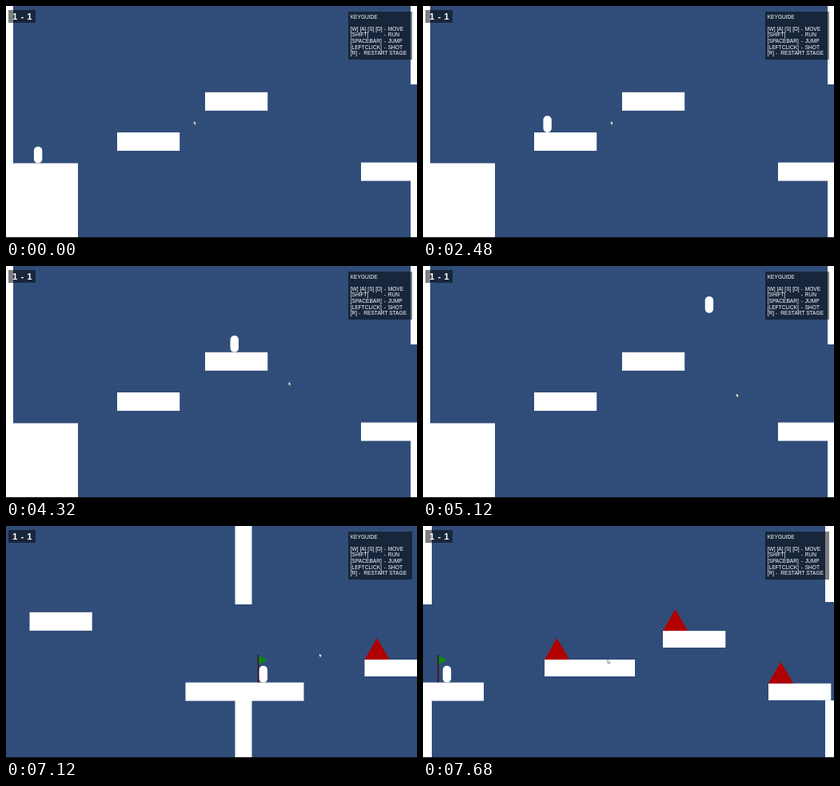
Recreate the animation shown at these times as an HTML page. Size 514x290 px, loop 7.76 s.

```html
<!DOCTYPE html>
<html lang="en">
<head>
<meta charset="utf-8">
<title>Platform stage</title>
<style>
  html, body { margin: 0; width: 100%; height: 100%; overflow: hidden; background: #304d79; }
  svg { display: block; width: 514px; height: 290px; }
  text { font-family: "Liberation Sans", Arial, sans-serif; fill: #fff; white-space: pre; }
</style>
</head>
<body>
<svg viewBox="0 0 514 290">
  <rect width="514" height="290" fill="#304d79"/>
  <g id="world">
    <g id="blocks" fill="#fff"></g>
    <g id="spikes" fill="#b00000"></g>
    <path d="M535 161V195.5" stroke="#4c0b12" stroke-width="1.5"/>
    <path d="M536 162L545.5 167.5L536 173Z" fill="#0a8c14"/>
    <rect id="player" width="10.4" height="20.8" rx="5" fill="#fff"/>
  </g>
  <rect y="289" width="514" height="1" fill="#080808"/>
  <g fill="#000" fill-opacity=".5">
    <rect x="3" y="5" width="34" height="16"/>
    <rect x="428" y="7" width="80" height="60"/>
  </g>
  <text x="7.9" y="16.6" font-size="11.4" font-weight="bold" word-spacing="1">1 - 1</text>
  <g id="guide" font-size="6.6"></g>
  <path id="cursor" d="M0 0L0 5L1.2 4L2 6L2.8 5.6L2 3.7L3.4 3.6Z" fill="#fff" stroke="#222" stroke-width=".4"/>
</svg>
<script>
const LOOP = 7760, STEP = 80, WIDTH = 514, HEIGHT = 290;
const byId = id => document.getElementById(id);

function add(parent, tag, attrs, text = "") {
  const node = document.createElementNS("http://www.w3.org/2000/svg", tag);
  for (const key in attrs) node.setAttribute(key, attrs[key]);
  node.textContent = text;
  byId(parent).append(node);
}

// Each platform returns its top, where the player or a spike can stand.
function platform(x, y, width, height = 23) {
  add("blocks", "rect", { x, y, width, height });
  return y;
}

// A wall with a doorway between two heights.
function wall(x, doorTop, doorBottom, width = 21) {
  platform(x, 0, width, doorTop);
  platform(x, doorBottom, width, HEIGHT - doorBottom);
}

function spikedPlatform(x, y, width) {
  platform(x, y, width, 21);
  add("spikes", "path", { d: `M${x} ${y}l15.5 -27l15.5 27Z` });
}

wall(-12, 197, 197);
wall(506, 98, 218);
wall(1019, 95, 218);
const ground = platform(-10, 196.5, 100, 94);
const low = platform(139, 158, 78.2);
const high = platform(249, 107.8, 78.2);
const exit = platform(444, 195.6, 148);
spikedPlatform(668, 167, 113);
spikedPlatform(816, 131, 78.3);
spikedPlatform(948, 196.8, 78.3);

const guide = `KEYGUIDE

[W] [A] [S] [D]|MOVE
[SHIFT]|RUN
[SPACEBAR]|JUMP
[LEFTCLICK]|SHOT
[R]|RESTART STAGE`;
guide.split("\n").forEach((line, row) => {
  const [key, action] = line.split("|");
  const y = 16 + row * 7.65 - (row ? .5 : 0);
  add("guide", "text", { x: 430.7, y }, key);
  if (!action) return;
  const dashX = key === "[R]" ? 441 : 472.8;
  add("guide", "text", { x: dashX, y }, "-");
  add("guide", "text", { x: dashX + (key === "[R]" ? 6.3 : 4.9), y }, action);
});

// The player runs from stop to stop; drag smooths every start and stop.
const SPEED = .124, DRAG = 230, START_X = 40.1;
const runs = [{ at: 200, to: 155.7 }, { at: 2550, to: 287 }, { at: 4325, to: 476.6 }, { at: 6175, to: 546.4 }];
const travel = u => u > 0 ? SPEED * (u - DRAG * (1 - Math.exp(-u / DRAG))) : 0;

function playerX(t) {
  let x = START_X, from = START_X;
  for (const { at, to } of runs) {
    const release = at + (to - from) / SPEED;
    x += travel(t - at) - travel(t - release);
    from = to;
  }
  return x;
}

const GRAVITY = .000397, LIFT = .2012;
const jumps = [{ at: 713, from: ground, to: low }, { at: 2970, from: low, to: high }, { at: 4713, from: high, to: exit }];

function playerFeet(t) {
  const jump = jumps.filter(j => t >= j.at).pop();
  if (!jump) return ground;
  const u = t - jump.at;
  const y = jump.from - LIFT * u + GRAVITY * u * u / 2;
  return u < LIFT / GRAVITY ? y : Math.min(y, jump.to);
}

// The camera pans one screen at a steady pace.
const cameraX = t => Math.max(0, Math.min(WIDTH + 2, (t - 6713.5) * .54));

// The cursor rests between three sweeps.
const sweeps = [
  { at: 3360, ms: 720, dx: 118.5, dy: 1 },
  { at: 4880, ms: 240, dx: 38.5, dy: 14.5 },
  { at: 7120, ms: 560, dx: -161, dy: 7.5 }
];
const ease = k => k <= 0 ? 0 : k >= 1 ? 1 : k * k * (3 - 2 * k);

function cursorAt(t) {
  let x = 234.8, y = 143.5;
  for (const { at, ms, dx, dy } of sweeps) {
    const k = ease((t - at) / ms);
    x += dx * k;
    y += dy * k;
  }
  return `${x} ${y}`;
}

function draw(now) {
  const t = Math.floor(now % LOOP / STEP) * STEP;
  byId("player").setAttribute("x", playerX(t) - 5.2);
  byId("player").setAttribute("y", playerFeet(t) - 20.8);
  byId("world").setAttribute("transform", `translate(${-cameraX(t)} 0)`);
  byId("cursor").setAttribute("transform", `translate(${cursorAt(t)})`);
}

const start = performance.now();
function tick() {
  draw(performance.now() - start);
  requestAnimationFrame(tick);
}
tick();
</script>
</body>
</html>
```
